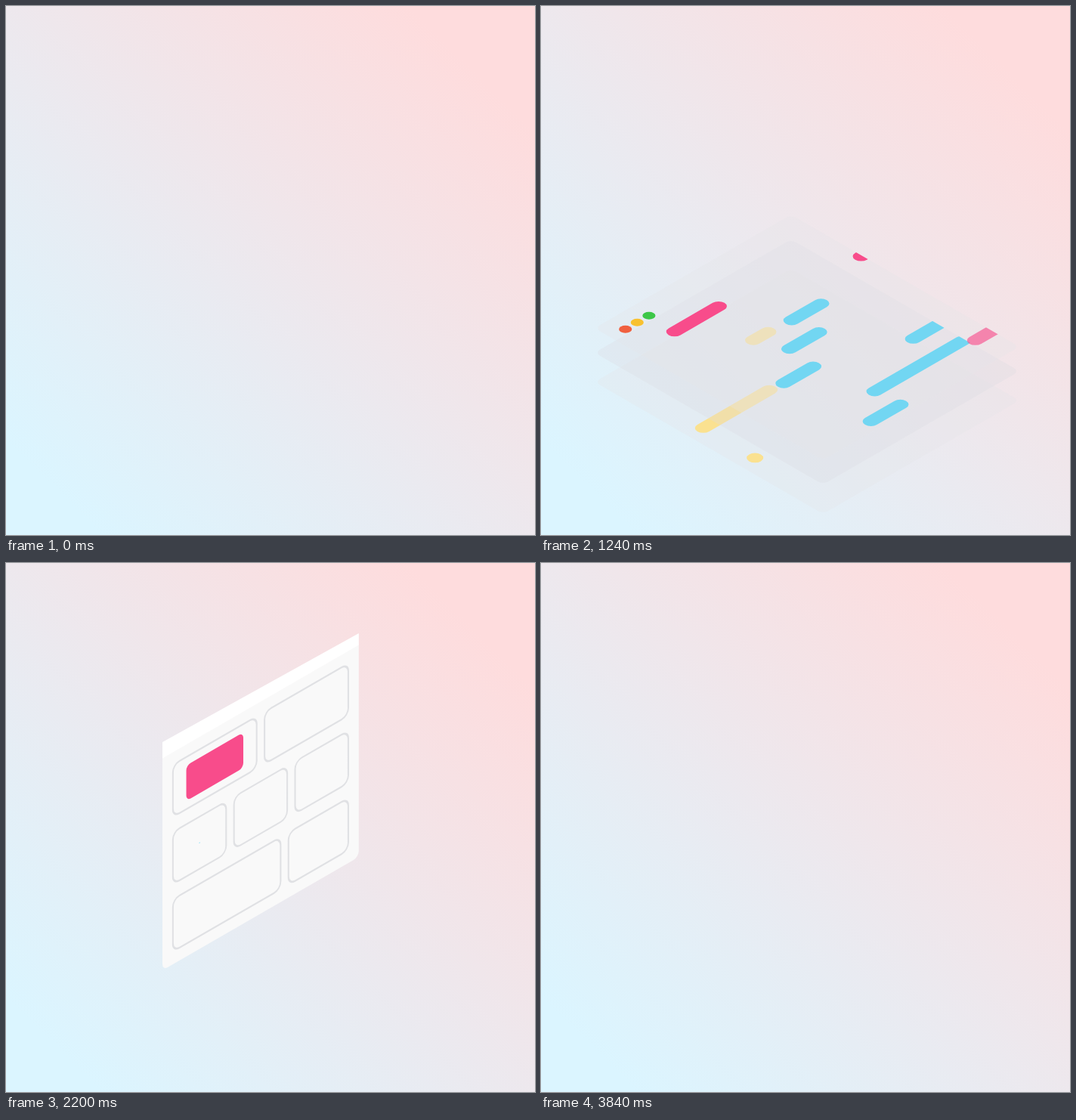
Animation, 700 px wide and 700 px high, one loop 3.96 s. Source, as an HTML page with a canvas:

```html
<!DOCTYPE html>
<html lang="en">
<head>
<meta charset="utf-8">
<title>Code to layout</title>
<style>
  html, body { margin: 0; width: 100%; height: 100%; overflow: hidden; }
  body { background: linear-gradient(45deg, #dbf5ff 9%, #fedcdd 88%); }
  canvas { display: block; width: 700px; height: 700px; }
</style>
</head>
<body>
<canvas id="stage"></canvas>
<script>
const LOOP = 3960, STEP = 40;
const W = 300, H = 349, R = 8, COS = 0.866;
const GREY = '#dfe0e4';
const COLORS = { r: '#f84c8b', b: '#41d0f6', y: '#fae190' };
const DOTS = ['#f0603f', '#f8c130', '#3cc748'];

// Lines of code: colour and length of each bar, then the order of entry (a first)
const LINES = 'r6 y2|b4 r6|y9 b4|b4 r10|y0 r6 b8|b12 r6|r6 b4';
const BAR_TURNS = 'efjkacgndohilmb';
const BAR = { unit: 11.2, gap: 31, left: 22, top: 65, pitch: 39.5, r: 9, travel: 300, time: 1000 };

// Page grid: relative tile widths per row, colours and order of entry
const GRID = [[1, 1], [1, 1, 1], [9, 5]];
const TILE_COLORS = 'rybybbr';
const TILE_TURNS = 'aebcgfd';
const TILE = { left: 16, top: 85, h: 69, pitch: 89, gap: 12, r: 10, start: 2027, stagger: 152, time: 280 };

const SHEETS = [
  { key: 'y', lift: 46, tint: '#e3e4e9', closed: 1840 },
  { key: 'b', lift: 0, tint: '#d9d9e0', closed: 1840 },
  { key: 'r', lift: -37, tint: '#e3e4e9', closed: 1950 }
];

const canvas = document.getElementById('stage');
const ctx = canvas.getContext('2d');
const dpr = window.devicePixelRatio || 1;
canvas.width = canvas.height = 700 * dpr;

const clamp = x => Math.min(1, Math.max(0, x));
const ease = (t, start, length) => (1 - Math.cos(Math.PI * clamp((t - start) / length))) / 2;
const turnOf = (turns, i) => turns.charCodeAt(i) - 97;

// Bars enter in two waves: four first, the rest after a pause
function layBars() {
  const bars = [];
  LINES.split('|').forEach((line, row) => {
    let x = BAR.left;
    for (const word of line.split(' ')) {
      const length = word.slice(1) * BAR.unit;
      const turn = turnOf(BAR_TURNS, bars.length);
      bars.push({
        key: word[0], x, y: BAR.top + BAR.pitch * row, length,
        start: 65 * turn + (turn < 4 ? 0 : 200)
      });
      x += length + BAR.gap;
    }
  });
  return bars;
}

function layTiles() {
  const tiles = [];
  GRID.forEach((shares, row) => {
    const room = W - 2 * TILE.left - TILE.gap * (shares.length - 1);
    const total = shares.reduce((a, b) => a + b);
    let x = TILE.left;
    for (const share of shares) {
      const i = tiles.length, w = room * share / total;
      tiles.push({
        x, y: TILE.top + TILE.pitch * row, w, color: COLORS[TILE_COLORS[i]],
        start: TILE.start + TILE.stagger * turnOf(TILE_TURNS, i)
      });
      x += w + TILE.gap;
    }
  });
  return tiles;
}

const bars = layBars(), tiles = layTiles();

function box(x, y, w, h, r) {
  ctx.beginPath();
  ctx.roundRect(x, y, w, h, r);
}

// Lying sheet at m = 0, upright window at m = 1
function project(m, shift) {
  ctx.setTransform(dpr, 0, 0, dpr, 0, 0);
  ctx.transform(COS, -0.5, COS * (1 - m), 0.5 + 0.5 * m, 71 + 136 * m, 458.7 - 268.7 * m + shift);
}

function drawDots() {
  DOTS.forEach((color, i) => {
    ctx.fillStyle = color;
    ctx.beginPath();
    ctx.arc(22 + 18 * i, 25, 7, 0, 2 * Math.PI);
    ctx.fill();
  });
}

function drawBar(bar, t, alpha) {
  const p = ease(t, bar.start, BAR.time);
  const rest = BAR.travel * (1 - p);
  ctx.globalAlpha = alpha * clamp(p * 4);
  // The slide runs slightly askew to the sheet
  box(bar.x + rest - BAR.r, bar.y + 0.02 * rest - BAR.r, bar.length + 2 * BAR.r, 2 * BAR.r, BAR.r);
  ctx.fill();
}

function drawSheet(sheet, t, m, alpha) {
  const spread = ease(t, 0, 480) * (1 - ease(t, 1030, sheet.closed - 1030));
  ctx.save();
  project(m, sheet.lift * spread);
  box(0, 0, W, H, R);
  ctx.globalAlpha = 0.3 * alpha;
  ctx.fillStyle = sheet.tint;
  ctx.fill();
  ctx.clip();
  ctx.fillStyle = COLORS[sheet.key];
  bars.filter(bar => bar.key === sheet.key).forEach(bar => drawBar(bar, t, alpha));
  if (sheet.key === 'r') {
    ctx.globalAlpha = alpha;
    drawDots();
  }
  ctx.restore();
}

function drawTile({ x, y, w, color, start }, t) {
  const s = ease(t, start, TILE.time), h = TILE.h;
  if (s) {
    ctx.fillStyle = color;
    box(x + w * (1 - s) / 2, y + h * (1 - s) / 2, w * s, h * s, TILE.r * s);
    ctx.fill();
  }
  ctx.strokeStyle = '#e0e1e4';
  ctx.lineWidth = 2.4;
  box(x, y, w, h, TILE.r);
  ctx.stroke();
}

function drawWindow(t, m, alpha) {
  const ready = t >= 2240;
  ctx.save();
  project(m, 0);
  ctx.globalAlpha = alpha;
  ctx.fillStyle = '#f9f9f9';
  box(0, 68, W, H - 68, [0, 0, R, R]);
  ctx.fill();
  ctx.fillStyle = '#fff';
  ctx.beginPath();
  ctx.moveTo(0, ready ? 43.5 : 47);
  ctx.lineTo(W, ready ? 43.5 : 53);
  ctx.lineTo(W, 68.5);
  ctx.lineTo(0, 68.5);
  ctx.fill();
  tiles.forEach(tile => drawTile(tile, t));
  if (ready) {
    ctx.fillStyle = GREY;
    box(0, 0, W, 43.5, [R, R, 0, 0]);
    ctx.fill();
    drawDots();
  }
  ctx.restore();
}

function draw(t) {
  ctx.setTransform(1, 0, 0, 1, 0, 0);
  ctx.clearRect(0, 0, canvas.width, canvas.height);
  canvas.style.opacity = 1 - clamp((t - 3600) / 240);
  const m = ease(t, 1840, 280);
  const code = clamp(t / 320) * clamp(1 - 1.6 * m);
  const page = clamp(1.6 * m - 0.6);
  if (code) SHEETS.forEach(sheet => drawSheet(sheet, t, m, code));
  if (page) drawWindow(t, m, page);
}

const begin = performance.now();
function tick() {
  const t = (performance.now() - begin) % LOOP;
  draw(Math.floor(t / STEP) * STEP);
  requestAnimationFrame(tick);
}
tick();
</script>
</body>
</html>
```
